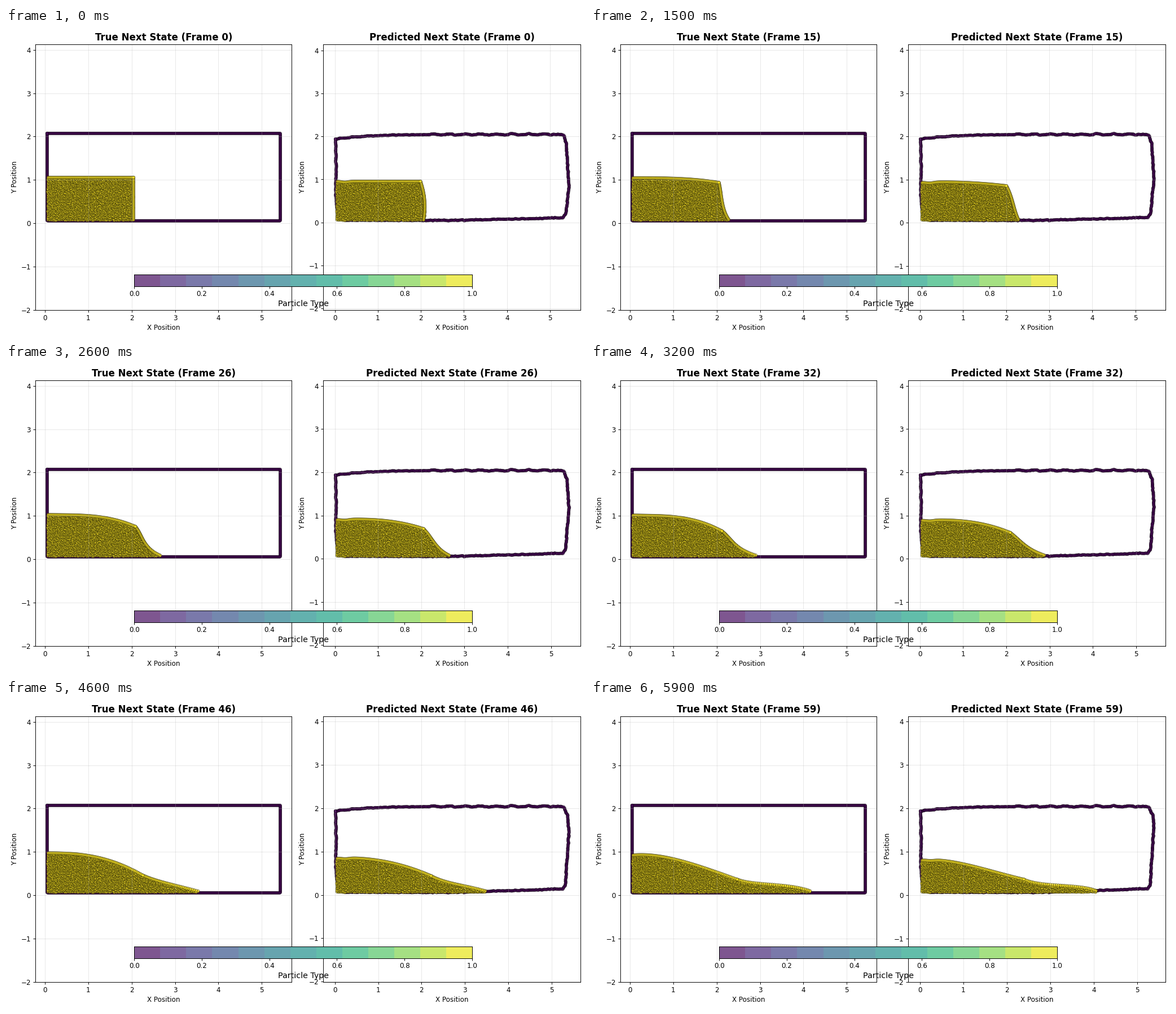
A matplotlib script for the animation above (6 s loop, 1026 px wide and 546 px high).

```python
import numpy as np
import matplotlib.pyplot as plt
from matplotlib.animation import FuncAnimation

W, H, DPI = 1026, 546, 96
PX = 72 / DPI            # one pixel in points
FRAMES = 60
STEP = 1.92              # particle spacing in pixels
COLS, ROWS = 170, 40     # lattice that covers the widest spread
TOP, SIDE = 80, 40       # beads along the free surface
FLOOR = 340
N_WALL = 590

plt.rcParams.update({
    "font.family": "DejaVu Sans", "font.size": 11.875 * PX,
    "axes.titlesize": 16.625 * PX, "axes.titleweight": "bold",
    "axes.titlepad": 7.1 * PX, "axes.labelpad": 4.75 * PX,
    "axes.linewidth": 0.95 * PX, "grid.linewidth": 0.95 * PX,
    "xtick.major.size": 4.16 * PX, "ytick.major.size": 4.16 * PX,
    "xtick.major.width": 0.95 * PX, "ytick.major.width": 0.95 * PX,
    "xtick.major.pad": 4.16 * PX, "ytick.major.pad": 4.16 * PX,
})

rng = np.random.default_rng(4)
JITTER = rng.normal(0, 0.38, (ROWS, COLS, 2))
WOBBLE = rng.normal(0, 0.4, (N_WALL, 2))
WOBBLE = (WOBBLE + np.roll(WOBBLE, 1, axis=0)) * 0.6


def settle(f, k):
    """Slow start, then levelling off at 1."""
    return (1 - np.exp(-k * f ** 2)) / (1 - np.exp(-k))


def spread(n):
    """Advance of the foot: accelerates towards 4 px per step."""
    return np.hypot(90.9, 4 * n) - 90.9


def cubic(pts, s):
    """Cubic through four evenly spaced control points."""
    t = 3 * s[:, None]
    return (-(t - 1) * (t - 2) * (t - 3) / 6 * pts[0]
            + t * (t - 2) * (t - 3) / 2 * pts[1]
            - t * (t - 1) * (t - 3) / 2 * pts[2]
            + t * (t - 1) * (t - 2) / 6 * pts[3])


class Fluid:
    """Column of particles that collapses to the right.

    Seven control points: four along the top up to the corner, three down
    the side to the foot. drop and shift are their total travels.
    """

    def __init__(self, left, corner, foot, top, drop, shift, sag, lag, bulge, dip):
        x = np.r_[np.linspace(left, corner, 4), np.linspace(corner, foot, 4)[1:]]
        x[4:6] += bulge
        y = np.r_[[top] * 4, np.linspace(top, FLOOR, 4)[1:]]
        self.start = np.column_stack([x, y])
        self.drop, self.shift = np.array(drop), np.array(shift)
        self.sag, self.lag, self.dip = sag, lag, dip
        i, j = np.meshgrid(np.arange(COLS), np.arange(ROWS))
        self.grid = np.dstack([left + i * STEP, FLOOR - j * STEP]) + JITTER

    def surface(self, n):
        f = n / (FRAMES - 1)
        fall = np.r_[f ** self.sag, f ** 1.8, f ** 1.6,
                     settle(f, 2.7), settle(f, 2.7), settle(f, 4.5), f]
        run = np.r_[f, f ** 2, f ** self.lag, f ** self.lag, f ** 2, f ** 1.9,
                    spread(n) / spread(FRAMES - 1)]
        pts = self.start + np.column_stack([self.shift * run, self.drop * fall])
        u = np.linspace(0, 1, TOP)
        top = cubic(pts[:4], u)
        top[:, 1] += self.dip * np.exp(-((u - 0.09) / 0.06) ** 2)
        return top, cubic(pts[3:], np.linspace(0, 1, SIDE))

    def particles(self, n):
        top, side = self.surface(n)
        edge = np.vstack([top, side])
        x, y = self.grid[..., 0], self.grid[..., 1]
        limit = np.interp(x, np.maximum.accumulate(edge[:, 0]), edge[:, 1], right=H)
        inside = (y > limit + 1)[..., None]
        body = np.where(inside, self.grid, np.nan).reshape(-1, 2)
        return np.vstack([body, side[::-1], top])


def resample(path):
    path = np.asarray(path, float)
    d = np.r_[0, np.cumsum(np.hypot(*np.diff(path, axis=0).T))]
    s = np.linspace(0, d[-1], N_WALL)
    return np.column_stack([np.interp(s, d, path[:, k]) for k in (0, 1)])


def true_wall():
    l, r, t, b = 72.9, 486.1, 186.8, 341.8
    return resample([(l, t), (r, t), (r, b), (l, b), (l, t)])


def pred_wall(f):
    x = np.linspace(584, 978, 120)
    wave = np.where(x > 745, np.cos((x - 757) / 28 * 2 * np.pi), 0)
    y = 188.6 + 8.5 * np.exp((584 - x) / 55) - 0.9 * wave
    rest = [(988, 190), (993 + 3 * f, 205), (997.6, 285 - 65 * f),
            (992 - f, 329 - f), (986, 336.5 - 2 * f), (800, 341),
            (600, 340.7), (588, 337), (584, 290), (585, 250), (584, 197)]
    return resample(np.vstack([np.column_stack([x, y]), rest])) + WOBBLE


def box(x0, y0, x1, y1, **kw):
    return fig.add_axes([x0 / W, 1 - y1 / H, (x1 - x0) / W, (y1 - y0) / H], **kw)


def panel(left, right):
    ax = box(left, 29, right, 500, facecolor="none")
    ax.set_xticks(range(6))
    ax.set_yticks(range(-2, 5))
    ax.set_xlabel("X Position", labelpad=4 * PX)
    ax.set_ylabel("Y Position")
    ax.grid(True, alpha=0.3)
    return ax


def view(ax, left, right, x0, y0, scale):
    """Set limits so that the data origin sits at stage pixel (x0, y0)."""
    ax.set_xlim((left - x0) / scale, (right - x0) / scale)
    ax.set_ylim((y0 - 500) / scale, (y0 - 29) / scale)


def dots():
    kind = np.r_[np.zeros(N_WALL), np.ones(ROWS * COLS + SIDE + TOP)]
    zero = np.zeros_like(kind)
    return stage.scatter(zero, zero, c=kind, cmap="viridis", vmin=0, vmax=1,
                         s=(5.31 * PX) ** 2, alpha=0.7,
                         edgecolors="black", linewidths=0.6 * PX)


fig = plt.figure(figsize=(W / DPI, H / DPI), dpi=DPI, facecolor="white")
stage = box(0, 0, W, H)
stage.axis("off")
true_dots, pred_dots = dots(), dots()
stage.set_xlim(0, W)
stage.set_ylim(H, 0)

true_fluid = Fluid(74.8, 226, 226, 265, sag=1.9, lag=2.8, bulge=0, dip=0,
                   drop=[10, 13.3, 29, 53, 35, 14.3, -1.5],
                   shift=[0, 4, 14, 33, 70, 118, 162])
pred_fluid = Fluid(587, 734.5, 740, 272, sag=1.3, lag=2.2, bulge=4, dip=1.5,
                   drop=[12, 15.5, 29.5, 46, 32, 13, -2],
                   shift=[0, 7, 18, 32.5, 66, 112, 155])

true_ax = panel(52.4, 506.3)
pred_ax = panel(562.4, 1018.4)
view(true_ax, 52.4, 506.3, 69, 346.1, 76.86)

bar = box(227.4, 437, 825.8, 457.6)
edges = np.linspace(0, 1, 14)
mids = (edges[:-1] + edges[1:]) / 2
bar.pcolormesh(edges, [0, 1], mids[None], cmap="viridis", vmin=0, vmax=1, alpha=0.7)
bar.set_xlim(0, 1)
bar.set_xticks(np.linspace(0, 1, 6))
bar.set_yticks([])
bar.tick_params(pad=3.6 * PX)
bar.set_xlabel("Particle Type", fontsize=14.25 * PX, labelpad=3.7 * PX)


def update(n):
    f = n / (FRAMES - 1)
    true_dots.set_offsets(np.vstack([true_wall(), true_fluid.particles(n)]))
    pred_dots.set_offsets(np.vstack([pred_wall(f), pred_fluid.particles(n)]))
    view(pred_ax, 562.4, 1018.4, 582.5 + 0.4 * f, 344.8 + f, 76.3 + 0.65 * f)
    true_ax.set_title(f"True Next State (Frame {n})")
    pred_ax.set_title(f"Predicted Next State (Frame {n})")
    return true_dots, pred_dots


anim = FuncAnimation(fig, update, frames=FRAMES, interval=100,
                     repeat=True, repeat_delay=0, blit=False)
plt.show()
```
